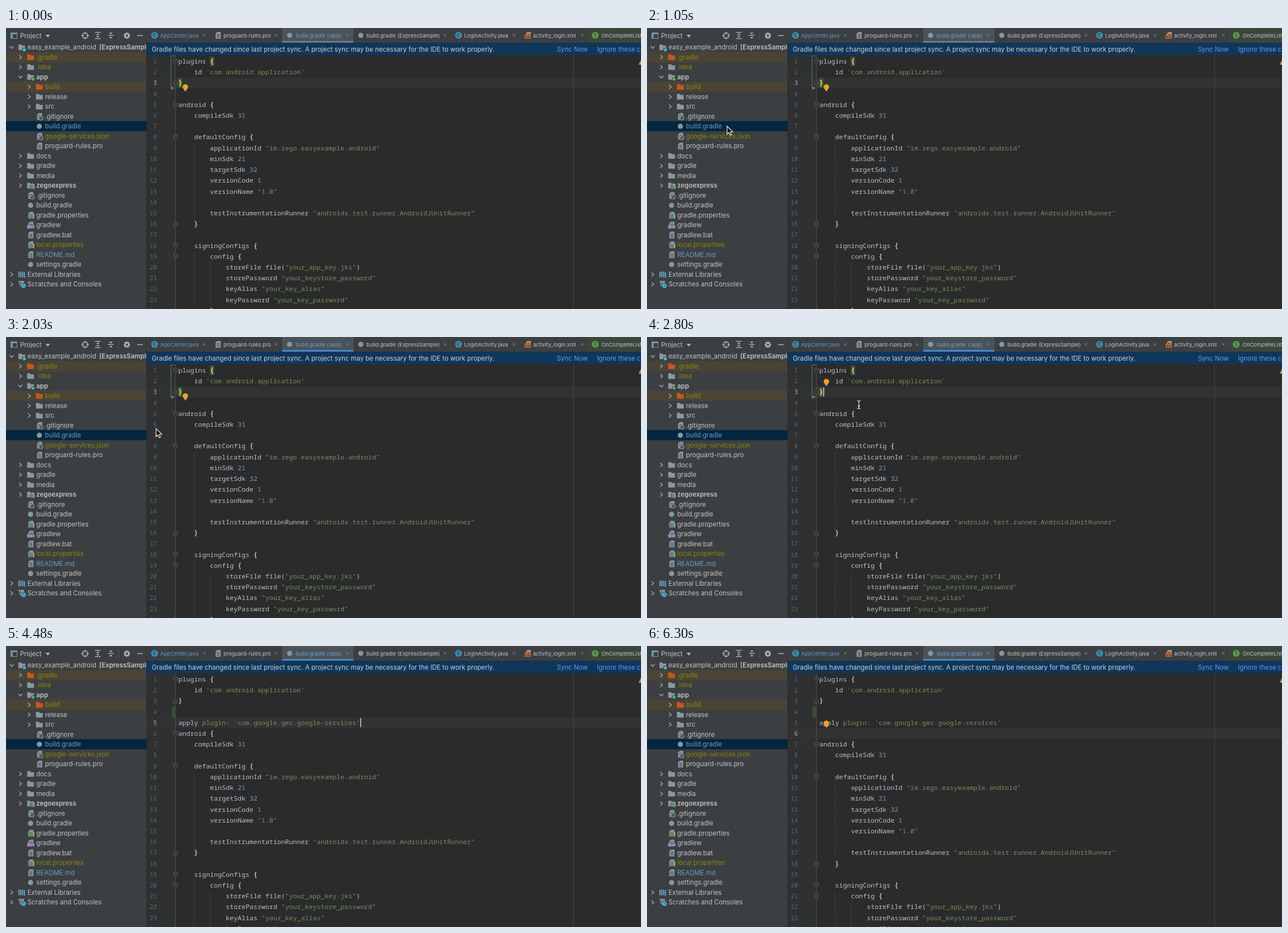
These frames come from a looping animation (1124 px wide and 498 px high, 6650 ms). An HTML page with a canvas:

```html
<!DOCTYPE html>
<html lang="en">
<head>
<meta charset="utf-8">
<title>Editing build.gradle</title>
<style>
html, body { margin: 0; width: 100%; height: 100%; overflow: hidden; background: #2b2b2b; }
canvas { display: block; width: 1124px; height: 498px; }
</style>
</head>
<body>
<canvas id="stage" width="1124" height="498"></canvas>
<script>
const ctx = document.getElementById('stage').getContext('2d');
const W = 1124, H = 498, SIDE = 249, LOOP = 6650, STEP = 70;
const UI = 'Inter, "Open Sans", sans-serif';
const MONO = '"Noto Sans Mono", "DejaVu Sans Mono", monospace';
const CHAR = 7, CODE_X = 305, LINE_H = 19.21, ROW_H = 17.5;
const COLOR = {
  text: '#c1c3c5', code: '#b5c1cf', string: '#6f9160', number: '#6c9cc2',
  ignored: '#878708', edited: '#6a9bc4', icon: '#8c979e', panel: '#3c3f41'
};

const BASE = `plugins {
    id 'com.android.application'
}

android {
    compileSdk 31

    defaultConfig {
        applicationId "im.zego.easyexample.android"
        minSdk 21
        targetSdk 32
        versionCode 1
        versionName "1.0"

        testInstrumentationRunner "androidx.test.runner.AndroidJUnitRunner"
    }

    signingConfigs {
        config {
            storeFile file("your_app_key.jks")
            storePassword "your_keystore_password"
            keyAlias "your_key_alias"
            keyPassword "your_key_password"
        }`.split('\n');
const APPLY = "apply plugin: 'com.google.gms.google-services'";

// label, level, icon, arrow, style
const TREE = [
  ['easy_example_android', 0, 'module', 'v'],
  ['.gradle', 1, 'orange', '>', 'ignored'],
  ['.idea', 1, 'folder', '>', 'ignored'],
  ['app', 1, 'dot', 'v', 'bold'],
  ['build', 2, 'orange', '>', 'ignored'],
  ['release', 2, 'folder', '>'],
  ['src', 2, 'folder', '>'],
  ['.gitignore', 2, 'deny'],
  ['build.gradle', 2, 'disc', '', 'edited'],
  ['google-services.json', 2, 'deny', '', 'ignored'],
  ['proguard-rules.pro', 2, 'file'],
  ['docs', 1, 'folder', '>'],
  ['gradle', 1, 'folder', '>'],
  ['media', 1, 'folder', '>'],
  ['zegoexpress', 1, 'bars', '>', 'bold'],
  ['.gitignore', 1, 'deny'],
  ['build.gradle', 1, 'disc'],
  ['gradle.properties', 1, 'chart'],
  ['gradlew', 1, 'cpp'],
  ['gradlew.bat', 1, 'file'],
  ['local.properties', 1, 'chart', '', 'ignored'],
  ['README.md', 1, 'file', '', 'edited'],
  ['settings.gradle', 1, 'disc'],
  ['External Libraries', 0, 'library', '>'],
  ['Scratches and Consoles', 0, 'scratch', '>']
];

// label, icon x, text x, close x, icon, colour
const TABS = [
  ['AppCenter.java', 263, 273, 351, 'class', '#5f97cf'],
  ['proguard-rules.pro', 375, 385, 478, 'file', COLOR.text],
  ['build.gradle (:app)', 502, 513, 604, 'disc', '#6a9fd4'],
  ['build.gradle (ExpressSample)', 628, 638, 777, 'disc', COLOR.text],
  ['LoginActivity.java', 801, 811, 899, 'class', COLOR.text],
  ['activity_login.xml', 924, 933, 1020, 'xml', COLOR.text],
  ['OnCompleteListener.java', 1043, 1054, 1140, 'interface', COLOR.text]
];

// Pointer moves: first step, last step, start, end
const MOVES = [
  [70, 490, [520, 420], [197, 246]],
  [840, 1050, [197, 246], [141, 174]],
  [1820, 2380, [141, 174], [438, 146]],
  [2520, 2800, [438, 146], [375, 120]],
  [3290, 3640, [375, 120], [423, 322]]
];

const between = (t, a, b) => t >= a && t < b;
const lineY = n => 59 + LINE_H * (n - 1);

function rect(x, y, w, h, color) {
  ctx.fillStyle = color;
  ctx.fillRect(x, y, w, h);
}

function text(str, x, y, color, font, align = 'left') {
  ctx.font = font;
  ctx.fillStyle = color;
  ctx.textAlign = align;
  ctx.fillText(str, x, y);
}

function poly(points, fill, stroke, width = 1, close = true) {
  ctx.beginPath();
  points.forEach(([x, y]) => ctx.lineTo(x, y));
  if (close) ctx.closePath();
  if (fill) { ctx.fillStyle = fill; ctx.fill(); }
  if (stroke) { ctx.strokeStyle = stroke; ctx.lineWidth = width; ctx.stroke(); }
}

function circle(x, y, r, fill, stroke, width = 1) {
  ctx.beginPath();
  ctx.arc(x, y, r, 0, Math.PI * 2);
  if (fill) { ctx.fillStyle = fill; ctx.fill(); }
  if (stroke) { ctx.strokeStyle = stroke; ctx.lineWidth = width; ctx.stroke(); }
}

const line = (x1, y1, x2, y2, color, width = 1) =>
  poly([[x1, y1], [x2, y2]], null, color, width, false);

function chevron(x, y, dir) {
  const pts = dir === '>' ? [[-2, -3.5], [2, 0], [-2, 3.5]] : [[-3.5, -2], [0, 2], [3.5, -2]];
  poly(pts.map(([a, b]) => [x + a, y + b]), null, '#adadad', 1.3, false);
}

function folder(x, y, color) {
  poly([[-6, -5], [-1, -5], [0.5, -3], [6, -3], [6, 5], [-6, 5]].map(([a, b]) => [x + a, y + b]), color);
}

function page(x, y, color = COLOR.icon) {
  poly([[-1, -6], [5, -6], [5, 6], [-4, 6], [-4, -3]].map(([a, b]) => [x + a, y + b]), color);
  for (const dy of [-2, 0.5, 3]) rect(x - 2, y + dy, 5, 1, COLOR.panel);
}

function bars(x, y) {
  ['#62b543', '#40b6e0', '#f4af3d'].forEach((c, i) => rect(x + i * 2.6, y - 3 - i % 2 * 2, 1.8, 8 + i % 2 * 2, c));
}

function badge(x, y, letter, color) {
  circle(x, y, 6, color);
  text(letter, x, y + 3, '#25333c', `600 8.5px ${UI}`, 'center');
}

const ICONS = {
  folder: (x, y) => folder(x, y, COLOR.icon),
  orange: (x, y) => folder(x, y, '#c4591c'),
  module(x, y) { folder(x, y, COLOR.icon); rect(x + 1, y + 1, 6, 6, COLOR.panel); rect(x + 2, y + 2, 5, 5, '#40b6e0'); },
  dot(x, y) { folder(x, y, COLOR.icon); circle(x + 4.5, y + 4, 3.5, COLOR.panel); circle(x + 4.5, y + 4, 2.5, '#4fc45a'); },
  bars(x, y) { folder(x, y, COLOR.icon); rect(x - 1, y - 1, 8, 7, COLOR.panel); bars(x, y + 1); },
  file: (x, y) => page(x, y),
  deny(x, y) {
    page(x, y);
    circle(x + 3, y + 3, 3.6, COLOR.panel, '#a7b0b5');
    line(x + 0.8, y + 0.8, x + 5.2, y + 5.2, '#a7b0b5');
  },
  chart(x, y) { page(x, y); rect(x - 1, y - 1, 8, 8, COLOR.panel); bars(x - 0.5, y + 1); },
  cpp(x, y) {
    page(x, y);
    rect(x - 6, y, 13, 6, '#7d6a9e');
    text('C++', x + 0.5, y + 5.5, '#e0dcea', `600 6px ${UI}`, 'center');
  },
  disc: (x, y) => circle(x, y, 4.6, '#87979f'),
  library(x, y) {
    [0, 1, 2, 3].forEach(i => rect(x - 6 + i * 3.2, y - 5 + (i === 3 ? 1 : 0), 2, 10, i % 2 ? '#40b6e0' : COLOR.icon));
  },
  scratch(x, y) {
    poly([[x - 6, y - 6], [x + 4, y - 6], [x + 4, y + 4], [x - 3, y + 4]], COLOR.icon);
    poly([[x - 4, y - 4], [x - 1, y - 2], [x - 4, y]], null, COLOR.panel, 1, false);
    circle(x + 3, y + 2.5, 4.5, '#40b6e0', COLOR.panel);
    poly([[x + 3, y], [x + 3, y + 3], [x + 5, y + 3]], null, '#2b4b58', 1, false);
  },
  class: (x, y) => badge(x, y, 'C', '#3e93b4'),
  interface: (x, y) => badge(x, y, 'I', '#5a9b48'),
  xml(x, y) {
    page(x, y);
    rect(x - 6, y - 1, 11, 7, '#c9682c');
    text('<>', x - 0.5, y + 5, '#3b2a20', `700 7px ${UI}`, 'center');
  }
};

function drawHeader() {
  const c = '#afb1b3';
  rect(8, 8, 12, 11, '#87939a');
  rect(9, 11, 10, 7, COLOR.panel);
  rect(9, 11, 3, 7, '#40a0c8');
  text('Project', 25, 18, COLOR.text, `11.45px ${UI}`);
  poly([[70, 12], [78, 12], [74, 17]], c);
  circle(140, 13.5, 5, null, c, 1.4);
  for (const [dx, dy] of [[1, 0], [-1, 0], [0, 1], [0, -1]]) {
    line(140 + dx * 2, 13.5 + dy * 2, 140 + dx * 6.5, 13.5 + dy * 6.5, c, 1.4);
  }
  for (const [x, sign] of [[162.5, -1], [185.5, 1]]) {
    if (sign < 0) { rect(x - 5, 7, 10, 1.4, c); rect(x - 5, 18, 10, 1.4, c); }
    else rect(x - 5, 12.5, 10, 1.4, c);
    for (const side of [-1, 1]) {
      const tip = 13.2 + side * (sign < 0 ? 4 : 1.8), tail = 13.2 + side * (sign < 0 ? 1 : 5);
      poly([[x - 3, tail], [x + 3, tail], [x, tip]], c);
    }
  }
  rect(199, 6, 1, 15, '#515456');
  for (let i = 0; i < 4; i++) {
    const a = i * Math.PI / 4, dx = Math.cos(a) * 5.8, dy = Math.sin(a) * 5.8;
    line(214 - dx, 13.5 - dy, 214 + dx, 13.5 + dy, c, 2.2);
  }
  circle(214, 13.5, 4.3, c);
  circle(214, 13.5, 1.9, COLOR.panel);
  rect(232, 12.7, 10, 1.5, c);
}

function drawTree(focused) {
  ctx.save();
  ctx.beginPath();
  ctx.rect(0, 0, SIDE, H);
  ctx.clip();
  rect(0, 0, SIDE, H, COLOR.panel);
  rect(SIDE - 1, 0, 1, H, '#313335');
  drawHeader();
  TREE.forEach(([label, level, icon, arrow, style], i) => {
    const y = 34.2 + i * ROW_H, x = 38 + level * 15.5;
    const top = Math.round(y - 9), selected = i === 8;
    if (icon === 'orange') rect(0, top, SIDE - 1, 18, '#4a4437');
    if (selected) rect(0, top, SIDE, 18, focused ? '#0b60cf' : '#04263f');
    if (arrow) chevron(10 + level * 15.5, y, arrow);
    ICONS[icon](x - 10, y);
    const color = selected && focused ? '#ffffff' : COLOR[style] || COLOR.text;
    text(label, x, y + 4.2, color, `${style === 'bold' ? 600 : 400} 11.45px ${UI}`);
  });
  text('[ExpressSample]', 165, 38.4, COLOR.text, `600 11.45px ${UI}`);
  rect(0, 497, SIDE, 1, '#2f3133');
  ctx.restore();
}

function drawTabs(editorFocused) {
  rect(SIDE, 0, W - SIDE, 26, COLOR.panel);
  rect(489, 0, 126, 26, '#4b5359');
  rect(1029, 0, 95, 26, '#3a463b');
  rect(489, 23, 126, 3, editorFocused ? '#4a88c7' : '#747a80');
  for (const [label, iconX, x, closeX, icon, color] of TABS) {
    ICONS[icon](iconX, 13);
    text(label, x, 16.7, color, `9.4px ${UI}`);
    line(closeX - 2.5, 10.5, closeX + 2.5, 15.5, '#7b7f82');
    line(closeX - 2.5, 15.5, closeX + 2.5, 10.5, '#7b7f82');
  }
  rect(SIDE, 26, W - SIDE, 22, '#10365a');
  const font = `11.45px ${UI}`;
  text('Gradle files have changed since last project sync. A project sync may be necessary for the IDE to work properly.',
    258, 41.5, '#cad1d8', font);
  text('Sync Now', 975, 41.5, '#589df6', font);
  text('Ignore these changes', 1046, 41.5, '#589df6', font);
}

function drawCode(source, y, keyColored) {
  const tokens = /'[^']*'|"[^"]*"|plugin:|\b\d+\b|[{}]|[^\s'"{}]+/g;
  for (const { 0: token, index } of source.matchAll(tokens)) {
    let color = COLOR.code;
    if (/^['"]/.test(token) || (token === 'plugin:' && keyColored)) color = COLOR.string;
    else if (/^\d+$/.test(token)) color = COLOR.number;
    const weight = /[{}]/.test(token) ? 700 : 500;
    text(token, CODE_X + index * CHAR, y + 4, color, `${weight} 11.667px ${MONO}`);
  }
}

function foldMarker(y, up) {
  const s = up ? -1 : 1;
  const pts = [[-3.5, -3.5], [3.5, -3.5], [3.5, 1.5], [0, 4.5], [-3.5, 1.5]];
  poly(pts.map(([a, b]) => [300 + a, y + b * s]), '#2b2b2b', '#5b5d5f');
  line(298, y, 302, y, '#66686a');
}

function matchedBrace(ch, col, row) {
  const x = CODE_X + col * CHAR, y = lineY(row);
  rect(x - 0.5, y - 8.5, 8, 17, '#3b514d');
  text(ch, x, y + 4, '#ffef28', `700 11.667px ${MONO}`);
}

function bulb(y) {
  circle(317.5, y, 4.8, '#f0a020');
  rect(315.5, y + 4.2, 4, 1.6, '#c9cbcd');
  rect(316, y + 6.3, 3, 1.2, '#a0a3a5');
}

function drawEditor(t) {
  const pasted = t >= 4130, split = t >= 4690;
  const matched = t < 2870;
  const current = split ? 6 : pasted ? 5 : matched ? 3 : 4;
  const lines = BASE.slice();
  if (pasted) lines.splice(4, 0, APPLY);
  if (split) lines.splice(5, 0, '');

  rect(SIDE, 48, W - SIDE, H - 48, '#2b2b2b');
  rect(SIDE, 48, 51, H - 48, '#2e3031');
  rect(SIDE, lineY(current) - 9.6, W - SIDE, LINE_H, '#323232');
  rect(1004, 48, 1, H - 48, '#464646');
  rect(299.5, 48, 1, H - 48, '#515355');
  if (pasted) rect(293, lineY(4) - 9, 6.5, 18.5, '#384c38');
  if (matched) {
    line(292, 49, 292, 106, '#41796b', 1.2);
    line(292, 49.5, 299, 49.5, '#41796b');
  }
  if (!pasted) poly([[292, 103], [299, 106.5], [292, 110]], '#6e7173');

  let depth = 0;
  lines.forEach((source, i) => {
    const y = lineY(i + 1), body = source.trim();
    if (y > H + 12) return;
    if (body === '}') depth--;
    const guides = body === '}' ? depth : depth - 1;
    for (let g = 1; g <= guides; g++) rect(CODE_X + g * 28, y - 9.6, 1, LINE_H, '#393b3c');
    text(i + 1, 267, y + 4, i + 1 === current ? '#b0b2b4' : '#64676a', `10.5px ${MONO}`, 'right');
    if (body.endsWith('{')) { foldMarker(y, false); depth++; }
    if (body === '}') foldMarker(y, true);
    drawCode(source, y, t >= 4480);
  });

  if (matched) {
    matchedBrace('{', 8, 1);
    matchedBrace('}', 0, 3);
  }
  poly([[1124, 56], [1120, 65], [1124, 65]], '#b3a25a');

  if (t < 2100) bulb(104.5);
  else if (t < 2870) bulb(79);
  else if (between(t, 3780, 4130)) bulb(98.5);
  else if (t >= 5530) bulb(137);

  const caret = (x, row) => rect(x, lineY(row) - 8, 1.6, 16, '#c8c8c8');
  if (between(t, 2380, 2870)) caret(312, 3);
  if (between(t, 2870, 3290)) caret(305, 4);
  if (between(t, 4130, 4690)) caret(CODE_X + APPLY.length * CHAR, 5);
  if (between(t, 4690, 6300)) caret(305, 6);
}

function pointerAt(t) {
  let pos = null;
  for (const [from, to, a, b] of MOVES) {
    if (t < from) break;
    const p = Math.min(1, (t - from + STEP) / (to - from + STEP));
    const e = p * p * (3 - 2 * p);
    pos = a.map((v, i) => v + (b[i] - v) * e);
  }
  return pos;
}

function drawPointer(t) {
  if (!between(t, 70, 4060)) return;
  const [x, y] = pointerAt(t);
  if (between(t, 1260, 1610) || between(t, 2870, 2940)) {
    circle(x + 1, y, 19, null, 'rgba(15, 15, 15, 0.75)', 1.5);
    circle(x + 1, y, 17.8, null, 'rgba(255, 255, 255, 0.35)', 1);
  }
  if (x > 300) {
    const beam = (color, width) => {
      line(x, y - 6, x, y + 6, color, width);
      for (const s of [-1, 1]) poly([[x - 3, y + s * 7.5], [x, y + s * 6], [x + 3, y + s * 7.5]], null, color, width, false);
      line(x - 2, y + 2.5, x + 2, y + 2.5, color, width);
    };
    beam('#1c1c1c', 3);
    beam('#f2f2f2', 1.3);
  } else {
    const shape = [[0, 0], [0, 14], [3.2, 11.2], [5.4, 16], [7.8, 15], [5.6, 10.2], [10, 10]];
    poly(shape.map(([a, b]) => [x + 0.8 + a, y + b]), '#0a0a0a', '#f4f4f4', 1.2);
  }
}

function render(now) {
  const t = Math.floor(now % LOOP / STEP) * STEP;
  drawEditor(t);
  drawTabs(t >= 1540);
  drawTree(between(t, 1330, 1540));
  drawPointer(t);
}

let start;
function tick(now) {
  start ??= now;
  render(Math.max(0, now - start));
  requestAnimationFrame(tick);
}
render(0);
requestAnimationFrame(tick);
</script>
</body>
</html>
```
